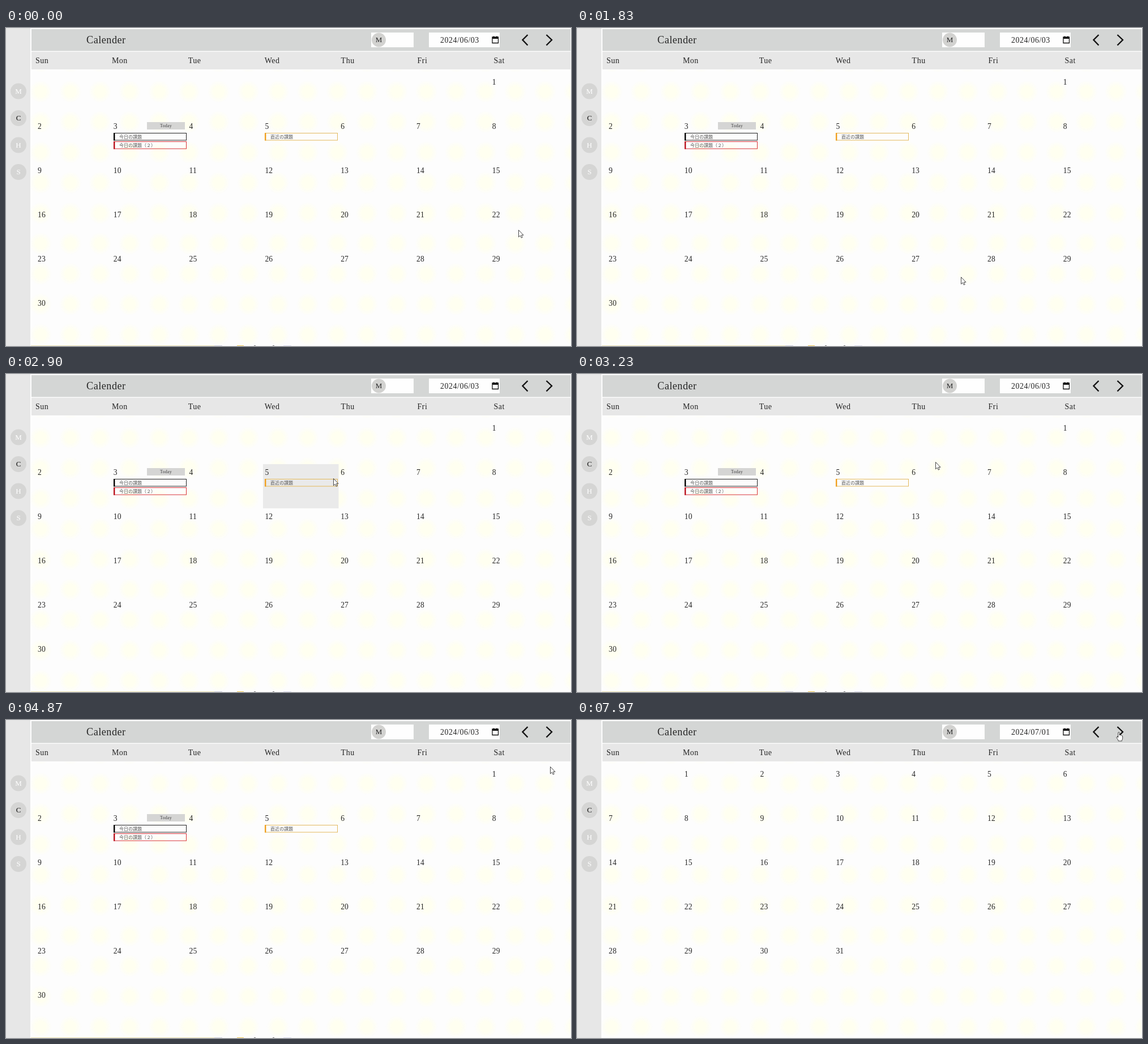
Recreate the animation shown at these times as an HTML page. Size 998 by 561 pixels, loop 8000 ms.

```html
<!DOCTYPE html>
<html lang="ja">
<head>
<meta charset="utf-8">
<title>Calender</title>
<style>
  html, body { margin: 0; width: 100%; height: 100%; overflow: hidden; background: #fdfdfd; }
  svg { display: block; width: 998px; height: 561px; }
  text { font: 14px "Liberation Serif", "Noto Serif", serif; letter-spacing: .5px; fill: #262626; }
  .title { font-size: 18.2px; }
  .day { font-size: 13.6px; letter-spacing: .1px; }
  .icon { font-size: 13px; letter-spacing: 0; text-anchor: middle; }
  .today { font-size: 8px; letter-spacing: .2px; text-anchor: middle; fill: #444; }
  .task { font: 300 8px "Noto Sans CJK JP", "Noto Sans CJK", sans-serif; letter-spacing: 0; fill: #555; }
</style>
</head>
<body>
<svg viewBox="0 0 998 561">
  <defs>
    <radialGradient id="glow">
      <stop offset=".45" stop-color="#fffff0"/>
      <stop offset="1" stop-color="#fffff0" stop-opacity="0"/>
    </radialGradient>
    <pattern id="dots" x="35" y="85.5" width="52.4" height="53.6" patternUnits="userSpaceOnUse">
      <circle cx="26.2" cy="26.8" r="20" fill="url(#glow)"/>
    </pattern>
  </defs>
  <rect width="998" height="561" fill="#fdfdfd"/>
  <rect x="44" y="74" width="953" height="487" fill="url(#dots)"/>
  <rect width="43" height="561" fill="#e7e7e7"/>
  <rect x="45" y="2" width="952" height="38.5" fill="#d4d6d5"/>
  <rect x="45" y="42" width="952" height="31" fill="#e7e7e7"/>
  <text class="title" x="142" y="27">Calender</text>
  <path d="M645 8h75v26h-75zM747 8h125v26h-125z" fill="#fefefe"/>
  <circle cx="658.5" cy="21" r="12.5" fill="#d2d2d0"/>
  <text class="icon" x="658.5" y="25.3">M</text>
  <text id="date" x="767" y="25.5"></text>
  <path d="M859 16h10.500v10.500h-10.500z" fill="none" stroke="#111" stroke-width="1.300"/>
  <path d="M859 16h10.500v3h-10.500zM860.500 14.500h2v2h-2zM866 14.500h2v2h-2z" fill="#111"/>
  <path d="M921.500 12l-9 9l9 9.500M954.500 12l9.500 9l-9.500 9.500" fill="none" stroke="#111" stroke-width="2.400"/>
  <g id="labels"></g>
  <g id="june"></g>
  <g id="july"></g>
  <g id="arrow"><path d="M.5 .5V12.800L3.300 10.200L5.300 14.200L7.200 13.300L5.400 9.400H9Z" fill="#fff" stroke="#333" stroke-width=".9"/></g>
  <g id="hand"><path d="M-1.200 9V1.200Q0 -.6 1.200 1.200V5.500Q2.500 4.800 3.300 6Q4.600 5.400 5.200 6.600Q6.700 6.400 6.700 8V11.500Q6.700 13 5.500 14.500V16H-1V14.500L-4.200 9.800Q-3.600 7.800 -1.200 9.500Z" fill="#fff" stroke="#333" stroke-width=".9"/></g>
</svg>
<script>
const LOOP = 8000, MONTH_CHANGE = 7050;
const COL = 133.8, ROW = 78.1;
const $ = id => document.getElementById(id);
const text = (cls, x, y, s, extra = '') => `<text class="${cls}" x="${x}" y="${y}" ${extra}>${s}</text>`;
const rect = (x, y, w, h, fill, extra = '') =>
  `<rect x="${x}" y="${y}" width="${w}" height="${h}" fill="${fill}" ${extra}/>`;

const days = (firstWeekday, count) => Array.from({ length: count }, (_, i) => {
  const cell = i + firstWeekday;
  return text('day', 56 + cell % 7 * COL, 99.7 + Math.floor(cell / 7) * ROW, i + 1);
}).join('');

const task = (x, y, label, line, edge = line) =>
  rect(x + .5, y + .5, 128, 12.5, 'none', `stroke="${line}"`) +
  rect(x, y, 2.4, 13.5, edge) + text('task', x + 10, y + 9.5, label);

$('labels').innerHTML =
  ['Sun', 'Mon', 'Tue', 'Wed', 'Thu', 'Fri', 'Sat'].map((d, i) => text('', 52 + i * 134.9, 62.3, d)).join('') +
  [...'MCHS'].map((c, i) => {
    const y = 111.5 + i * 47.5;
    return `<circle cx="22" cy="${y}" r="14" fill="#d5d5d4"/>` +
      text('icon', 22, y + 4.2, c, `style="fill:${c === 'C' ? '#111' : '#fff'}"`);
  }).join('');

const hoverCells = [
  { x: 186.500, y: 159, w: 133.500, h: 78 },
  { x: 454, y: 159, w: 133.500, h: 78 }
];
$('june').innerHTML =
  hoverCells.map(c => rect(c.x, c.y, c.w, c.h, '#eaeaea', 'class="hover"')).join('') +
  days(6, 30) +
  rect(249, 166, 67, 13, '#d5d5d4') + text('today', 282.5, 175.3, 'Today') +
  task(190, 185, '今日の課題', '#222', '#000') +
  task(190, 200, '今日の課題（２）', '#d8323a', '#b8101c') +
  task(457, 185, '直近の課題', '#e3b95c', '#f0a020') +
  rect(44, 560, 324, 1, '#ece3b4') + rect(368, 560, 14, 1, '#c9cad8') +
  rect(408, 560, 12, 1, '#f0c850') + rect(438, 560, 3, 1, '#777') +
  rect(471, 560, 3, 1, '#777') + rect(490, 560, 14, 1, '#dcdcee');
$('july').innerHTML = days(1, 31);

// Pointer tip: [ms, x, y]
const path = [
  [0, 905, 356], [1830, 678, 439], [2900, 578, 184], [3770, 748.5, 95],
  [4870, 961, 82], [5200, 976, 55], [5750, 957, 22], [5970, 954, 20],
  [6250, 954, 20], [6650, 956.5, 20.5], [LOOP, 956.5, 20.5]
];
function pointer(t) {
  const i = path.findIndex(p => p[0] > t);
  const [t0, x0, y0] = path[i - 1], [t1, x1, y1] = path[i];
  const u = (t - t0) / (t1 - t0), e = u * u * (3 - 2 * u);
  return [x0 + (x1 - x0) * e, y0 + (y1 - y0) * e];
}

const show = (el, on) => el.setAttribute('visibility', on ? 'visible' : 'hidden');
const hovers = document.querySelectorAll('.hover');

function draw(now) {
  const t = now % LOOP;
  const [x, y] = pointer(t).map(Math.round);
  const june = t < MONTH_CHANGE;
  const onButton = x > 944 && x < 975 && y < 36;
  $('date').textContent = june ? '2024/06/03' : '2024/07/01';
  show($('june'), june);
  show($('july'), !june);
  hoverCells.forEach((c, i) =>
    show(hovers[i], june && x >= c.x && x < c.x + c.w && y >= c.y && y < c.y + c.h));
  for (const id of ['arrow', 'hand']) {
    $(id).setAttribute('transform', `translate(${x} ${y})`);
    show($(id), (id === 'hand') === onButton);
  }
}

const start = performance.now();
(function frame() {
  draw(performance.now() - start);
  requestAnimationFrame(frame);
})();
</script>
</body>
</html>
```
